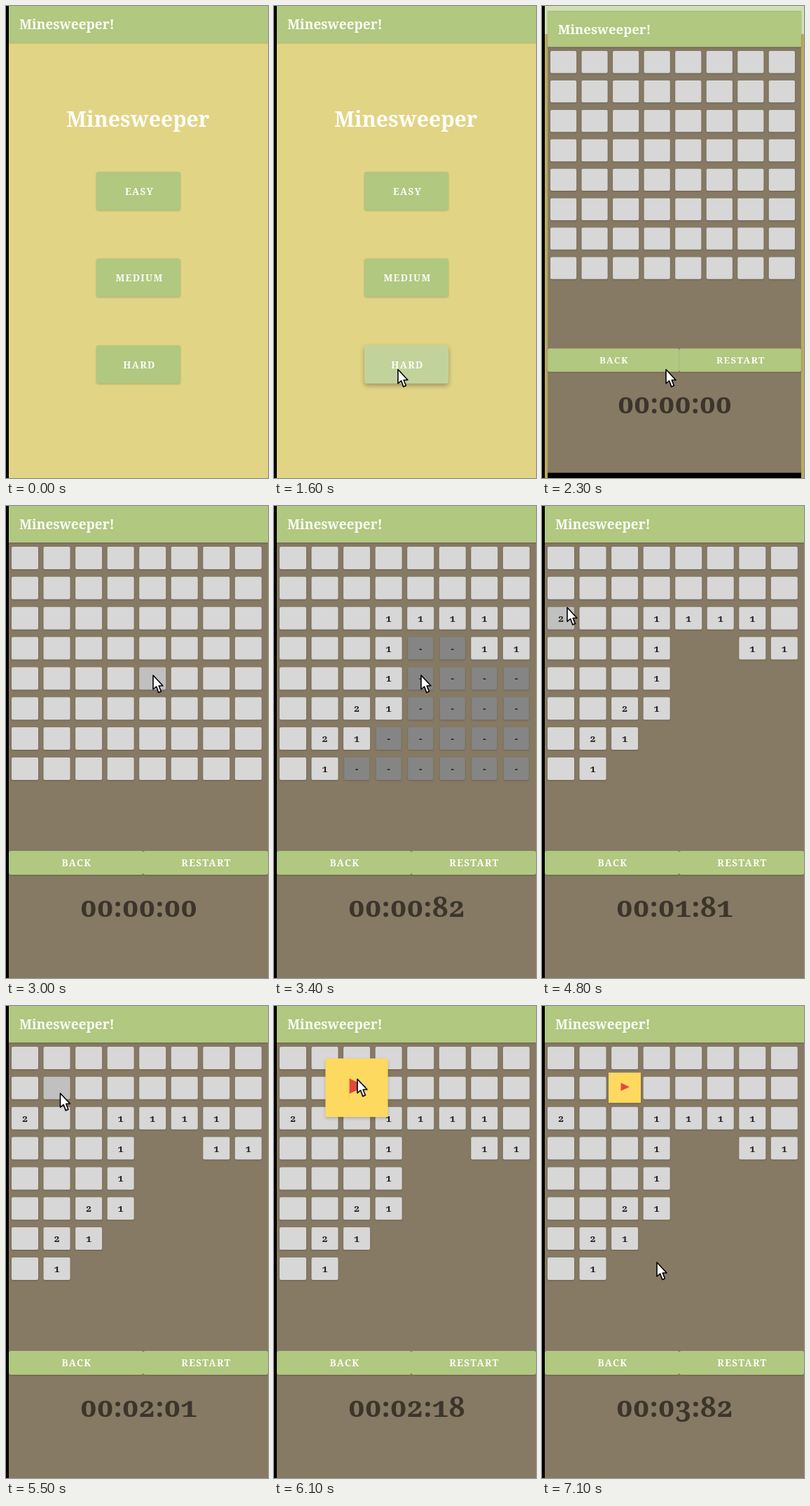
These frames come from a looping animation (374 by 672 pixels, 7200 ms). An HTML page:

```html
<!DOCTYPE html>
<html lang="en">
<head>
<meta charset="utf-8">
<title>Minesweeper</title>
<style>
  html, body { margin: 0; width: 100%; height: 100%; overflow: hidden; background: #000; }
  svg { display: block; width: 374px; height: 672px; }
  text {
    font-family: "Noto Serif", "DejaVu Serif", serif;
    font-weight: 600;
    font-variant-numeric: oldstyle-nums;
    fill: #fdfdf9;
  }
  .bar { font-size: 19px; }
  .title { font-size: 30.2px; text-anchor: middle; }
  .label { font-size: 13.5px; letter-spacing: 1.3px; text-anchor: middle; }
  .num { font-size: 14px; fill: #24211d; text-anchor: middle; font-weight: 700; }
  .timer { font-size: 40.5px; fill: #3c352b; text-anchor: middle; }
  .low { filter: drop-shadow(0 1px 1px rgba(0, 0, 0, .2)); }
  .high { filter: drop-shadow(0 3px 3px rgba(0, 0, 0, .3)); }
</style>
</head>
<body>
<svg id="stage" viewBox="0 0 374 672"></svg>
<script>
const LOOP = 7200, STEP = 100, SIZE = 8;
const GREEN = '#b0c87f', CELL = '#d7d7d7', HOVER = '#c0c0c0';

// Moments of the story, in ms
const ENTER = 700, OVER = 1100, PRESS = 2100, PAGE = 2200, SETTLED = 2700;
const OPEN = 3200, FADE = 3400, GONE = 3700, SECOND = 4700, FLAG = 6000;

// Each move: start, end, x, y
const MOVES = [
  [600, 1200, 177, 517.5],
  [2300, 2700, 210, 241],
  [3700, 4500, 36, 144.5],
  [5300, 5700, 119, 104],
  [6500, 7000, 164, 365]
];
// The clock runs unevenly between these times: ms, hundredths
const CLOCK = [[3000, 0], [3400, 82], [4800, 181], [6100, 218], [7100, 382]];
const MINES = new Set(['1,1', '1,4', '2,7', '3,0', '4,2', '5,1', '7,0']);

const stage = document.getElementById('stage');

function set(el, attrs) {
  for (const key in attrs) el.setAttribute(key, attrs[key]);
}

function add(parent, tag, attrs = {}, text = '') {
  const el = document.createElementNS('http://www.w3.org/2000/svg', tag);
  set(el, attrs);
  el.textContent = text;
  parent.appendChild(el);
  return el;
}

function box(parent, x, y, width, height, fill, more = {}) {
  return add(parent, 'rect', { x, y, width, height, fill, ...more });
}

function write(parent, cls, x, y, text) {
  return add(parent, 'text', { class: cls, x, y }, text);
}

function show(el, on) {
  el.style.display = on ? '' : 'none';
}

const progress = (t, a, b) => Math.min(1, Math.max(0, (t - a) / (b - a)));
const smooth = k => k * k * (3 - 2 * k);

// Rules of the game
function around(r, c) {
  const list = [];
  for (let y = Math.max(0, r - 1); y <= Math.min(SIZE - 1, r + 1); y++)
    for (let x = Math.max(0, c - 1); x <= Math.min(SIZE - 1, c + 1); x++)
      if (y !== r || x !== c) list.push([y, x]);
  return list;
}

function count(r, c) {
  return around(r, c).filter(p => MINES.has(p.join())).length;
}

const openAt = new Map();
function reveal(r, c, time) {
  const key = `${r},${c}`;
  if (openAt.has(key)) return;
  openAt.set(key, time);
  if (!count(r, c)) around(r, c).forEach(([y, x]) => reveal(y, x, time));
}
reveal(4, 4, OPEN);
reveal(2, 0, SECOND);

function appBar(parent) {
  box(parent, 4, 0, 370, 52, GREEN, { class: 'low' });
  write(parent, 'bar', 19, 33, 'Minesweeper!');
}

// Menu page
const menu = add(stage, 'g');
box(menu, 4, 0, 370, 672, '#e2d485');
appBar(menu);
write(menu, 'title', 188.5, 172, 'Minesweeper');
const [, , hard] = ['EASY', 'MEDIUM', 'HARD'].map((name, i) => {
  const y = 236 + i * 123.5;
  const rect = box(menu, 129, y, 120, 54.5, GREEN, { rx: 3, class: 'low' });
  write(menu, 'label', 190.5, y + 32.5, name);
  return rect;
});

// Dimmed page seen around the game while it zooms in
const dim = add(stage, 'g');
box(dim, 4, 0, 370, 672, '#b8aa60');
box(dim, 4, 0, 370, 40, '#cfe0b3');
box(dim, 8, 660, 362, 12, '#000');

// Game page
const game = add(stage, 'g');
box(game, 4, 0, 370, 672, '#867a64');
appBar(game);

const cells = Array.from({ length: SIZE * SIZE }, (_, i) => {
  const r = Math.floor(i / SIZE), c = i % SIZE;
  const x = 8 + c * 45.55, y = 58 + r * 42.85;
  const g = add(game, 'g');
  const rect = box(g, x, y, 38, 32, CELL, { rx: 2, class: 'low' });
  const num = write(g, 'num', x + 19, y + 21, '');
  return { g, rect, num, x, y, mines: count(r, c), time: openAt.get(`${r},${c}`) ?? LOOP };
});

const actions = add(game, 'g', { class: 'low' });
function action(name, x, width) {
  box(actions, x, 491, width, 34, GREEN, { rx: 3 });
  write(game, 'label', x + width / 2 + 1, 513, name);
}
action('BACK', 4, 192);
action('RESTART', 196, 178);
const timer = write(game, 'timer', 189.5, 585, '');

const flag = add(game, 'g');
box(flag, -23, -21.5, 46, 43, '#fed95f', { class: 'low' });
add(flag, 'path', { d: 'M-5.6-6.5V8', stroke: '#e5a94c', 'stroke-width': .7, 'stroke-dasharray': '1 1', opacity: .6 });
add(flag, 'path', { d: 'M-5.3-6.8L7-1L-5.3 4.4Z', fill: '#e2483d' });

const cursor = add(stage, 'path', {
  d: 'M0 0V20L4.6 16L7.8 24.6L11.4 23L8.2 15H14Z',
  fill: '#fff', stroke: '#000', 'stroke-width': 1.6, 'stroke-linejoin': 'round'
});
box(stage, 0, 0, 4, 672, '#000');

function cursorAt(t) {
  let x = 219, y = 690;
  for (const [from, to, nx, ny] of MOVES) {
    const k = smooth(progress(t, from, to));
    x += (nx - x) * k;
    y += (ny - y) * k;
  }
  return [x, y];
}

function clockText(t) {
  let n = 0;
  CLOCK.slice(1).forEach(([to, value], i) => {
    const [from, base] = CLOCK[i];
    n += (value - base) * progress(t, from, to);
  });
  n = Math.round(n);
  const two = v => String(v).padStart(2, '0');
  return [Math.floor(n / 6000), Math.floor(n / 100) % 60, n % 100].map(two).join(':');
}

function drawCell(cell, t, x, y) {
  const open = t >= cell.time;
  const blank = open && !cell.mines;
  const over = x >= cell.x && x <= cell.x + 38 && y >= cell.y && y <= cell.y + 32;
  const inset = blank ? 1 : 0;
  const fade = blank ? 1 - progress(t, FADE, GONE) : 1;
  cell.num.textContent = open ? cell.mines || '-' : '';
  set(cell.rect, {
    x: cell.x + inset,
    width: 38 - 2 * inset,
    fill: blank ? '#858585' : over ? HOVER : CELL
  });
  set(cell.g, { opacity: fade });
}

function draw(t) {
  const [x, y] = cursorAt(t);
  show(cursor, t >= ENTER);
  set(cursor, { transform: `translate(${x} ${y})` });

  set(hard, {
    fill: t >= PRESS ? '#c8d8a6' : t >= OVER ? '#c1d39b' : GREEN,
    class: t >= OVER ? 'high' : 'low'
  });

  const arrived = t >= PAGE + STEP;
  const zoom = t < SETTLED ? 1 - .09 * Math.exp((PAGE - t) / 71) : 1;
  show(menu, !arrived);
  show(dim, arrived && t < SETTLED);
  show(game, t >= PAGE);
  set(game, {
    opacity: arrived ? 1 : .6,
    transform: `translate(189 336) scale(${zoom}) translate(-189 -336)`
  });

  cells.forEach(cell => drawCell(cell, t, x, y));
  timer.textContent = clockText(t);

  const size = 1 + 1.4 * (1 - progress(t, FLAG, FLAG + 550)) ** 2;
  show(flag, t >= FLAG);
  set(flag, { transform: `translate(118 116.3) scale(${size})` });
}

let last = -1;
const start = performance.now();
function tick() {
  const t = Math.floor(((performance.now() - start) % LOOP) / STEP) * STEP;
  if (t !== last) draw(last = t);
  requestAnimationFrame(tick);
}
tick();
</script>
</body>
</html>
```
